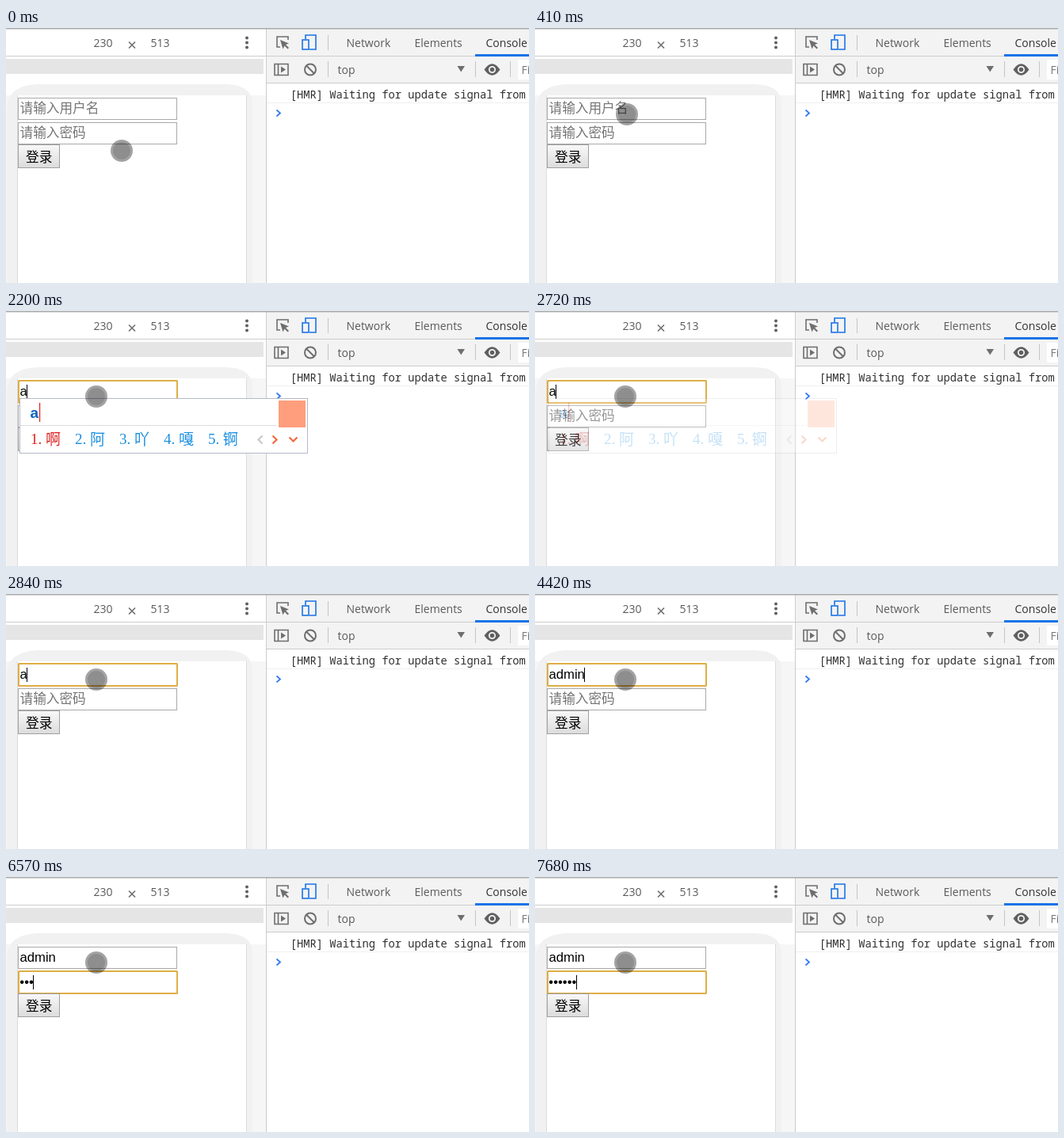
Recreate the animation shown at these times as an HTML page. Size 660 px wide and 322 px high, loop 8000 ms.

```html
<!DOCTYPE html>
<html lang="zh">
<head>
<meta charset="utf-8">
<style>
  html, body { margin: 0; width: 100%; height: 100%; overflow: hidden; background: #fff; }
  svg { display: block; width: 660px; height: 322px; }
  text { white-space: pre; }
  .ui { font: 14px "Open Sans", sans-serif; fill: #5a5a5a; }
  .mono { font: 13.75px "Noto Sans Mono", monospace; fill: #303030; }
  .field { font: 16.67px "Liberation Sans", Arial, sans-serif; }
  .cjk { font: 16.67px "Noto Sans CJK SC", "Noto Sans CJK", sans-serif; }
  .hint { fill: #757575; }
  .icon { fill: none; stroke: #6e6e6e; stroke-width: 1.6; }
  .number { font: 19px "Liberation Serif", serif; }
  .candidate { font: 300 19px "Noto Sans CJK SC", "Noto Sans CJK", sans-serif; }
</style>
</head>
<body>
<svg viewBox="0 0 660 322">
  <defs>
    <linearGradient id="face" x2="0" y2="1">
      <stop stop-color="#f8f8f8"/><stop offset="1" stop-color="#dcdcdc"/>
    </linearGradient>
  </defs>

  <!-- device preview -->
  <rect width="660" height="322" fill="#fff"/>
  <rect y="39" width="325" height="19" fill="#e5e5e5"/>
  <rect y="85" width="328" height="237" fill="#f6f6f6"/>
  <path d="M1 322V101Q3 71 42 71H276Q310 71 311 95V322Z" fill="#f1f1f1"/>
  <path d="M14.5 322V85H303.5V322" fill="#fff"/>
  <path d="M14.5 322V85M303.5 322V85" stroke="#dcdcdc"/>
  <text class="ui" x="110.5" y="24">230</text>
  <text class="ui" x="182.5" y="24">513</text>
  <path class="icon" d="M155 17.5l8 8m0-8l-8 8"/>
  <g fill="#5f5f5f">
    <circle cx="304" cy="12.5" r="2"/><circle cx="304" cy="18.5" r="2"/><circle cx="304" cy="24.5" r="2"/>
  </g>

  <!-- developer tools -->
  <rect x="329" width="331" height="70" fill="#f3f3f3"/>
  <path d="M328.5 0V322M0 35.5H660M329 69.5H660" stroke="#ccc"/>
  <path d="M329 94.5H660" stroke="#f0f0f0"/>
  <path d="M406.5 9V28M406.5 42V62M592.5 42V62M636.5 42V62" stroke="#c4c4c4"/>
  <rect width="660" height="1.5" fill="#aaa"/>
  <rect x="592" y="33" width="68" height="3" fill="#1a73e8"/>
  <text class="ui" x="429.5" y="24">Network</text>
  <text class="ui" x="515.5" y="24">Elements</text>
  <text class="ui" x="605.5" y="24" style="fill:#333">Console</text>
  <path class="icon" d="M346 24H342V11H356V15"/>
  <path d="M346 15l11 4.5-4 1.5 4 4-1.5 1.5-4-4-2 4Z" fill="#6e6e6e"/>
  <g fill="none" stroke="#1a73e8" stroke-width="1.6">
    <path d="M378 14V9H391V27H383"/><rect x="374" y="15" width="8" height="12"/>
  </g>
  <path class="icon" d="M339 45.5H356V59.5H339ZM343.5 45V60"/>
  <path d="M347 48.5l6 4-6 4Z" fill="#6e6e6e"/>
  <circle class="icon" cx="384" cy="52.5" r="7" style="stroke-width:2"/>
  <path class="icon" d="M379 47.5l10 10" style="stroke-width:2"/>
  <text class="ui" x="418.5" y="58">top</text>
  <path d="M569.5 48h9.5l-4.750 7.500Z" fill="#6e6e6e"/>
  <path d="M603.5 52.5Q613.5 38 623.5 52.5Q613.5 67 603.5 52.5" fill="#5f5f5f"/>
  <circle cx="613.5" cy="52.5" r="3.7" fill="#5f5f5f" stroke="#f3f3f3" stroke-width="1.8"/>
  <rect x="646" y="40" width="14" height="25" fill="#fff"/>
  <text class="ui" x="650.5" y="58" style="fill:#777">Filter</text>
  <text class="mono" x="358.8" y="89">[HMR] Waiting for update signal from</text>
  <path d="M341.5 103.500l4.500 4-4.500 4" fill="none" stroke="#367cf1" stroke-width="1.8"/>

  <!-- login form -->
  <g id="form"></g>
  <rect x="15.5" y="147.5" width="52" height="29" fill="url(#face)" stroke="#a0a0a0"/>
  <text class="cjk" x="25" y="169">登录</text>

  <!-- input method popup -->
  <g id="popup">
    <rect x="17.5" y="110.5" width="363" height="69" fill="#fff" stroke="#b4b9c6"/>
    <path d="M18 144.5H341" stroke="#ddd"/>
    <text x="30.5" y="135" fill="#0a63c4" style="font:bold 19px 'Liberation Sans',Arial,sans-serif">a</text>
    <rect x="42" y="116" width="1.2" height="24" fill="#e02020"/>
    <rect x="344" y="113" width="34" height="34" fill="#ff9e7d"/>
    <g id="candidates"></g>
    <g fill="none" stroke="#f26a3d" stroke-width="2.2">
      <path d="M323.5 157.5l-5 5 5 5" stroke="#c8c8c8"/>
      <path d="M336.5 157.5l5 5-5 5M357.5 159.5l5 5 5-5"/>
    </g>
  </g>

  <g id="pointer">
    <circle r="14" opacity=".36"/><circle r="11" opacity=".125"/>
  </g>
</svg>
<script>
const LOOP = 8000;
const byId = id => document.getElementById(id);

function add(parent, tag, attributes, content = '') {
  const node = document.createElementNS('http://www.w3.org/2000/svg', tag);
  for (const name in attributes) node.setAttribute(name, attributes[name]);
  node.textContent = content;
  return parent.appendChild(node);
}

// Each entry is [start time, value]; a value holds until the next entry.
const pointerSteps = [[0, [146, 155]], [140, [137, 140]], [260, [127, 125]], [410, [116, 109]], [530, [114, 108]]];
const focusSteps = [[0, ''], [650, 'name'], [5120, 'password']];
const caretSteps = [[0, true], [1200, false], [1640, true], [3370, false], [3810, true], [4970, false], [5120, true], [5680, false], [5960, true]];
const popupSteps = [[0, 0], [2200, 1], [2600, 0.6], [2720, 0.25], [2840, 0]];
const typing = (text, times) => [[0, ''], ...times.map((time, i) => [time, text.slice(0, i + 1)])];

function valueAt(steps, time) {
  let value = steps[0][1];
  for (const [start, next] of steps) if (start <= time) value = next;
  return value;
}

function makeField(id, y, hint, textX, steps) {
  const parent = byId('form');
  add(parent, 'rect', { x: 15.5, y: y + 0.5, width: 200, height: 27, fill: '#fff', stroke: '#a9a9a9' });
  return {
    id, textX, steps,
    ring: add(parent, 'rect', { x: 16, y, width: 200, height: 28, rx: 0.5, fill: 'none', stroke: '#dfae45', 'stroke-width': 2 }),
    hint: add(parent, 'text', { class: 'cjk hint', x: 17.5, y: y + 19.2 }, hint),
    text: add(parent, 'text', { class: 'field', x: textX, y: y + 19 }),
    caret: add(parent, 'rect', { y: y + 5, width: 1, height: 18 })
  };
}

const fields = [
  makeField('name', 88, '请输入用户名', 17.5, typing('admin', [2200, 3810, 4120, 4260, 4420])),
  makeField('password', 119, '请输入密码', 17.35, typing('••••••', [5960, 6260, 6570, 6970, 7250, 7680]))
];

[...'啊阿吖嘎锕'].forEach((character, i) => {
  const x = 31 + 56 * i, fill = i ? '#1b8fe0' : '#e02020';
  add(byId('candidates'), 'text', { class: 'number', x, y: 168, fill }, `${i + 1}.`);
  add(byId('candidates'), 'text', { class: 'candidate', x: x + 19, y: 168.5, fill }, character);
});

const show = (node, visible) => node.setAttribute('visibility', visible ? 'visible' : 'hidden');

function draw(time) {
  const focus = valueAt(focusSteps, time);
  for (const field of fields) {
    const value = valueAt(field.steps, time);
    const focused = field.id === focus;
    if (field.text.textContent !== value) field.text.textContent = value;
    const width = value ? field.text.getComputedTextLength() : 0;
    field.caret.setAttribute('x', Math.max(18, Math.floor(field.textX + width)));
    show(field.hint, !value);
    show(field.ring, focused);
    show(field.caret, focused && valueAt(caretSteps, time));
  }
  byId('popup').setAttribute('opacity', valueAt(popupSteps, time));
  byId('pointer').setAttribute('transform', `translate(${valueAt(pointerSteps, time)})`);
}

const start = performance.now();
function tick() {
  draw((performance.now() - start) % LOOP);
  requestAnimationFrame(tick);
}
tick();
</script>
</body>
</html>
```
